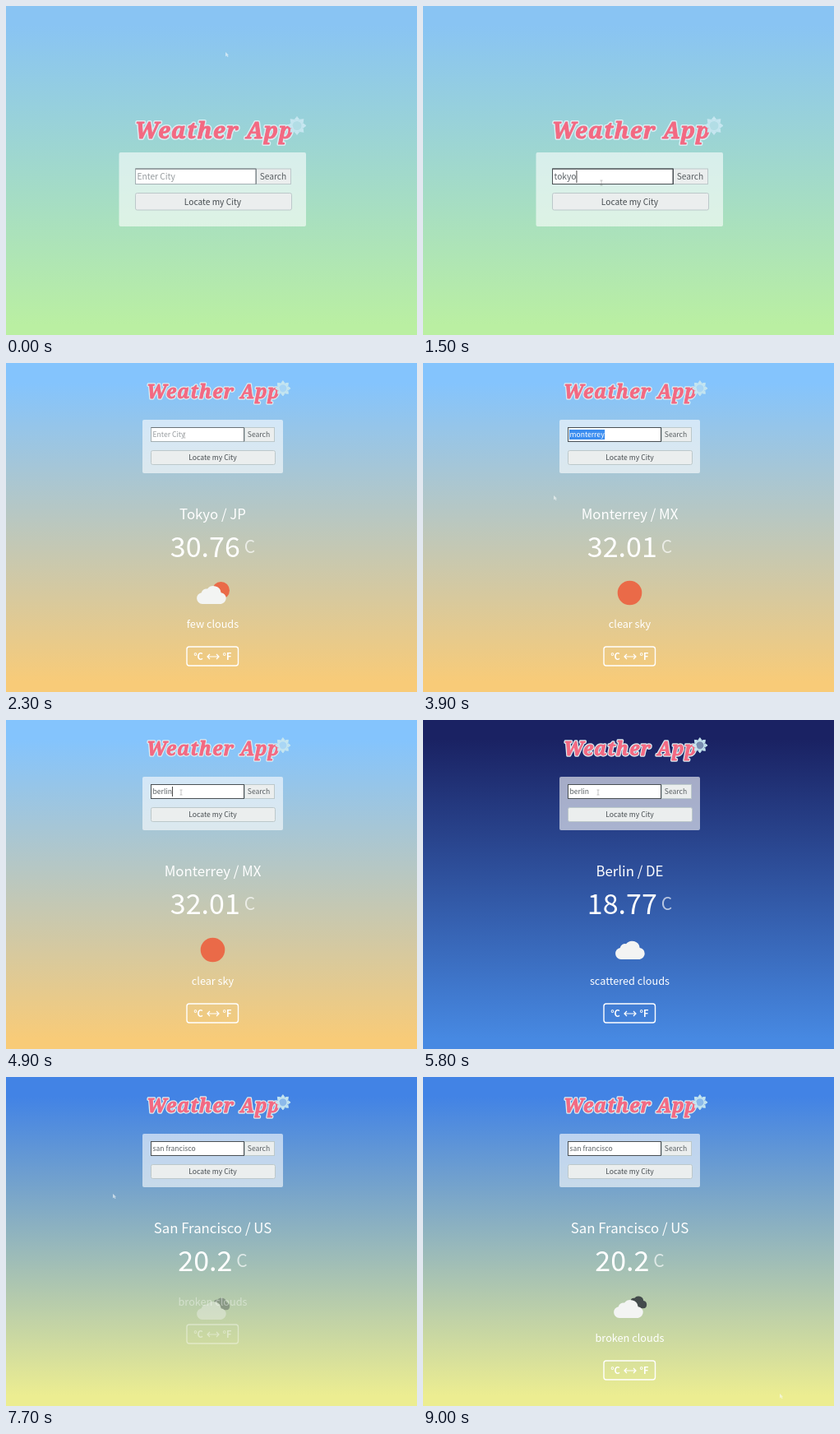
An HTML page that plays this animation: 500x400 px, repeating every 9100 ms.

```html
<!DOCTYPE html>
<html lang="en">
<head>
<meta charset="utf-8">
<title>Weather App</title>
<style>
html, body { margin: 0; width: 100%; height: 100%; overflow: hidden; }
svg { display: block; width: 500px; height: 400px; }
text { font-family: "Noto Sans CJK JP", "Noto Sans CJK SC", "Noto Sans", sans-serif; white-space: pre; }
.title text { font: italic 900 27px "Noto Serif", "Liberation Serif", serif; letter-spacing: 1.35px; stroke-linejoin: round; }
.mid { text-anchor: middle; }
.panel { fill: #fff; fill-opacity: .6; }
.key { fill: #ebeeee; stroke: #bcc8ca; }
.field { fill: #fff; stroke: #a3afb3; }
.edge { fill: none; stroke: #6a7276; }
.focus .field, .focus .edge { stroke: #4a5054; }
.form text { font-size: 10.2px; fill: #5a6064; }
.small .form text { font-size: 8.6px; }
.form .strong { fill: #464c50; font-weight: 500; }
.form .hint { fill: #959a9d; }
.form .picked { fill: #fff; }
.report { fill: #fff; }
.city { font-size: 16.8px; }
.temp { font-size: 34px; }
.unit { font-size: 21px; fill-opacity: .65; font-weight: 300; }
.sky { font-size: 12.7px; }
.swap text { font-size: 11px; font-weight: 700; }
.line { fill: none; stroke: #fff; stroke-width: 1.4; }
#arrow, #beam { opacity: .6; }
</style>
</head>
<body>
<svg viewBox="0 0 500 400">
  <defs>
    <linearGradient id="shade" x2="0" y2="1">
      <stop id="top" offset=".06"/><stop id="bottom" offset=".97"/>
    </linearGradient>
    <path id="cloud" d="M7 24a7 7 0 0 1-1-13.8a6 6 0 0 1 7-4.6a9 9 0 0 1 16 4.6a7 7 0 0 1 0 13.8z"/>
  </defs>
  <rect width="500" height="400" fill="url(#shade)"/>
  <g id="app">
    <g class="title" id="title">
      <text class="mid" x="253.5" y="160.5" fill="#d9edf2" stroke="#d9edf2" stroke-width="4">Weather App</text>
      <text class="mid" x="253.5" y="160.5" fill="#f36982" stroke="#f36982" stroke-width="1">Weather App</text>
      <g id="sun" transform="translate(354 145.5)" fill="#c6e6f0" stroke="#c6e6f0" stroke-width="2">
        <circle r="6.5" fill-opacity=".55"/>
      </g>
    </g>
    <g class="form" id="form">
      <rect class="panel" id="panel" rx="2"/>
      <rect class="key" id="search"/>
      <rect class="field" id="field"/>
      <path class="edge" id="edge"/>
      <rect class="key" id="locate" rx="2"/>
      <rect id="mark" fill="#3b8df0"/>
      <text id="value"></text>
      <path id="caret" stroke="#444"/>
      <text class="mid" id="searchText">Search</text>
      <text class="mid strong" id="locateText">Locate my City</text>
    </g>
    <g class="report" id="report">
      <text class="city mid" id="city" x="251.5" y="190"></text>
      <text class="temp mid" x="251.5" y="236"><tspan id="temp"></tspan><tspan class="unit" dx="5" dy="-5">C</tspan></text>
      <g id="icon">
        <circle id="disc" fill="#ea6a48"/>
        <use id="dark" href="#cloud" transform="translate(248.5 265) scale(.68)" fill="#444b4c"/>
        <use id="white" href="#cloud" fill="#f3f4f3"/>
      </g>
      <text class="sky mid" id="sky" x="251.5" y="322"></text>
      <g class="swap" id="swap">
        <rect class="line" x="220" y="345" width="62.5" height="23" rx="3"/>
        <text class="mid" x="234" y="360.5">°C</text>
        <text class="mid" x="269" y="360.5">°F</text>
        <path class="line" d="M245 357H259M248 354L245 357L248 360M256 354L259 357L256 360" style="stroke-width:1.2"/>
      </g>
    </g>
  </g>
  <path id="arrow" d="M0 0V5.4L1.4 4.2L2.6 6.2L3.5 5.6L2.5 3.8H4Z" fill="#f8fafa"/>
  <path id="beam" d="M-1.5 -3H1.5M0 -3V3M-1.5 3H1.5" stroke="#777" stroke-width=".7"/>
</svg>
<script>
const LOOP = 9100, STEP = 100;
const $ = id => document.getElementById(id);
const set = (id, attrs) => { for (const k in attrs) $(id).setAttribute(k, attrs[k]); };
const show = (id, on) => { $(id).style.display = on ? '' : 'none'; };
const box = (id, x, y, width, height) => set(id, { x, y, width, height });

const HOME = ['#89c4f3', '#baefa2'];
const DAY = ['#84c4fd', '#f8cb78'];
const NIGHT = ['#1a2263', '#4789e2'];
const DUSK = ['#4283e5', '#eced91'];

const reports = [
  { at: 1900, city: 'Tokyo / JP', temp: '30.76', sky: 'few clouds', icon: 'few', bg: DAY },
  { at: 3500, city: 'Monterrey / MX', temp: '32.01', sky: 'clear sky', icon: 'clear', bg: DAY },
  { at: 5100, city: 'Berlin / DE', temp: '18.77', sky: 'scattered clouds', icon: 'scattered', bg: NIGHT },
  { at: 7450, city: 'San Francisco / US', temp: '20.2', sky: 'broken clouds', icon: 'broken', bg: DUSK }
];

// Each entry: focus, first key, last key, moment of selection, end
const entries = [
  { word: 'tokyo', focus: 600, from: 800, to: 1400, pick: 1900, end: 1900 },
  { word: 'monterrey', focus: 2500, from: 2600, to: 3300, pick: 3800, end: 4200 },
  { word: 'berlin', focus: 4200, from: 4200, to: 4800, pick: 6000, end: 6200 },
  { word: 'san francisco', focus: 6200, from: 6200, to: 7200, pick: LOOP, end: LOOP }
];

// time, x, y
const track = [
  [0, 267, 56], [600, 217, 215], [1600, 217, 215], [2100, 217, 88], [3400, 217, 88],
  [3800, 159, 161], [4000, 159, 161], [4300, 213, 88], [6900, 213, 88],
  [7500, 130, 142], [8200, 130, 142], [8900, 434, 385], [LOOP, 434, 385]
];

for (let i = 0; i < 8; i++) {
  const ray = document.createElementNS('http://www.w3.org/2000/svg', 'path');
  ray.setAttribute('d', 'M-2.6 -7.5L0 -11L2.6 -7.5Z');
  ray.setAttribute('stroke-width', 1);
  ray.setAttribute('transform', `rotate(${i * 45})`);
  $('sun').append(ray);
}

function layout(small) {
  $('app').classList.toggle('small', small);
  set('title', { transform: small ? 'translate(39.5 -91.4) scale(.84)' : '' });
  if (small) {
    box('panel', 166, 69, 171, 65);
    box('field', 176.5, 78.5, 113, 17);
    box('search', 290.5, 78.5, 36, 17);
    box('locate', 176.5, 106.5, 151, 17);
  } else {
    box('panel', 137.5, 178, 227.5, 90);
    box('field', 157.5, 198, 147, 18.5);
    box('search', 304.5, 198, 42, 18.5);
    box('locate', 157.5, 227.5, 190, 20.5);
  }
  set('edge', { d: small ? 'M176.5 78.5H289.5V95.5' : 'M157.5 198H304V216.5' });
  set('searchText', small ? { x: 307.5, y: 90 } : { x: 325, y: 211 });
  set('locateText', small ? { x: 251.5, y: 118 } : { x: 251.5, y: 241.5 });
  set('value', small ? { x: 178.5, y: 90 } : { x: 159.5, y: 211 });
}

function drawField(t, small) {
  const e = entries.find(e => t >= e.focus && t < e.end);
  const part = e ? Math.min(1, Math.max(0, (t - e.from) / (e.to - e.from))) : 0;
  const word = e ? e.word.slice(0, Math.ceil(part * e.word.length)) : '';
  const picked = !!e && t >= e.pick;
  const value = $('value');
  value.textContent = word || 'Enter City';
  value.setAttribute('class', picked ? 'picked' : word ? '' : 'hint');
  $('form').classList.toggle('focus', !!e);

  const x = small ? 178.5 : 159.5, y = small ? 81 : 200, h = small ? 12 : 15;
  const w = word ? value.getComputedTextLength() : 0;
  show('mark', picked);
  box('mark', x - .5, y, w + 1, h);
  show('caret', e && !picked && t < e.to + 300);
  set('caret', { d: `M${x + w + .5} ${y}v${h}` });
}

function drawIcon(kind) {
  const two = kind === 'few' || kind === 'broken';
  show('disc', kind === 'few' || kind === 'clear');
  show('dark', kind === 'broken');
  show('white', kind !== 'clear');
  set('disc', kind === 'clear' ? { cx: 251.5, cy: 279.5, r: 14.8 } : { cx: 261.5, cy: 276.5, r: 10.5 });
  set('white', { transform: two ? 'translate(231.5 269) scale(1.04 1)' : 'translate(233.5 266.5) scale(1.04 1.02)' });
}

function drawReport(t, r) {
  show('report', r);
  if (!r) return;
  $('city').textContent = r.city;
  $('temp').textContent = r.temp;
  $('sky').textContent = r.sky;
  drawIcon(r.icon);
  // The lower rows sit higher until the icon has its full height
  const age = t - r.at, ready = age >= 350;
  const opacity = ready ? 1 : age < 150 ? 0 : .4;
  const rise = ready ? 0 : -44;
  set('icon', { opacity, transform: ready ? '' : 'translate(0 2)' });
  set('sky', { opacity, transform: `translate(0 ${rise})` });
  set('swap', { opacity, transform: `translate(0 ${rise})` });
}

function drawPointer(t, small) {
  const i = track.findIndex(p => p[0] > t);
  const [a, b] = [track[i - 1], track[i]];
  const k = (t - a[0]) / (b[0] - a[0]), s = k * k * (3 - 2 * k);
  const x = a[1] + (b[1] - a[1]) * s, y = a[2] + (b[2] - a[2]) * s;
  const over = small ? x > 176 && x < 290 && y > 78 && y < 96 : x > 157 && x < 304 && y > 197 && y < 218;
  show('arrow', !over);
  show('beam', over);
  set(over ? 'beam' : 'arrow', { transform: `translate(${x} ${y})` });
}

function draw(now) {
  const t = Math.floor((now % LOOP) / STEP) * STEP;
  const r = reports.filter(r => t >= r.at).pop();
  const bg = r ? r.bg : HOME;
  set('top', { 'stop-color': bg[0] });
  set('bottom', { 'stop-color': bg[1] });
  layout(!!r);
  drawField(t, !!r);
  drawReport(t, r);
  drawPointer(t, !!r);
}

const start = performance.now();
function tick() {
  draw(performance.now() - start);
  requestAnimationFrame(tick);
}
tick();
</script>
</body>
</html>
```
